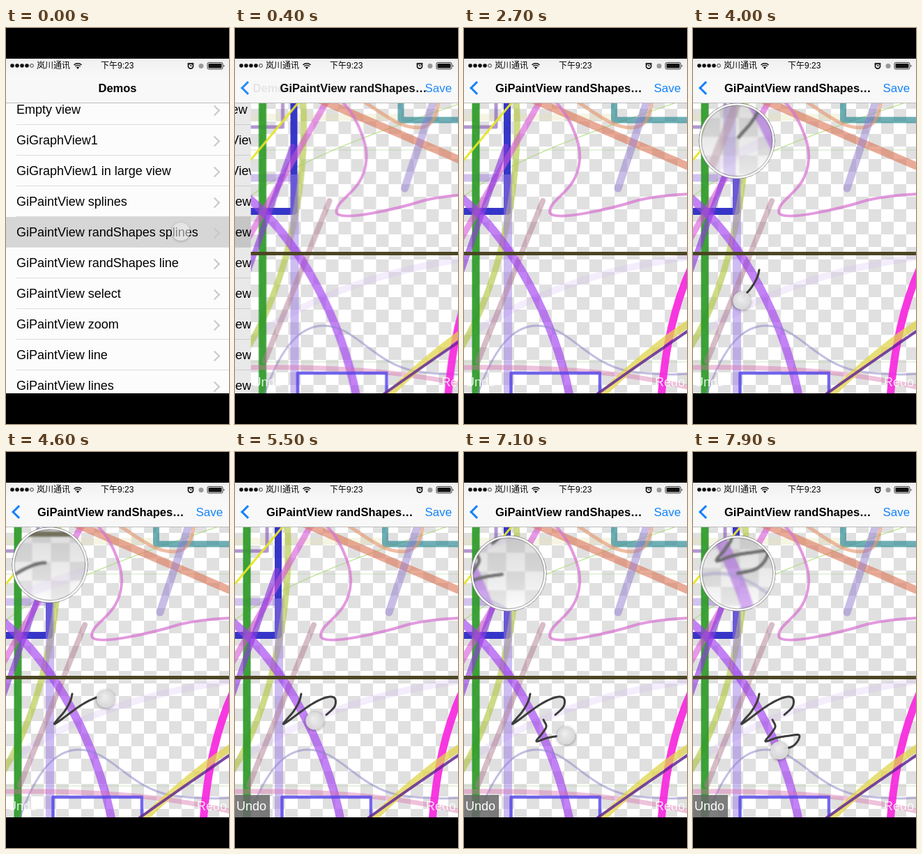
Write an HTML page with a canvas that moves like this. It is 320x568 px and loops after 8000 ms.

```html
<!DOCTYPE html>
<html lang="en">
<head>
<meta charset="utf-8">
<title>Paint demo</title>
<style>
  html, body { margin: 0; width: 100%; height: 100%; overflow: hidden; background: #000; }
  body { font-family: "Liberation Sans", "Noto Sans CJK SC", "Noto Sans CJK", sans-serif; color: #000; }
  #stage { position: absolute; left: 0; top: 0; width: 320px; height: 568px; overflow: hidden; background: #000; }
  #stage * { box-sizing: border-box; white-space: nowrap; }
  #stage div, #stage span, canvas, svg { position: absolute; }
  #screen { left: 0; top: 44px; width: 320px; height: 480px; overflow: hidden; background: #fcfcfc; }
  #list, #paint { left: 0; top: 0; width: 320px; height: 480px; }
  #list { background: #fcfcfc; }
  #shade { left: 0; top: 0; width: 320px; height: 480px; background: #000; }
  .row { left: 0; width: 320px; height: 44px; font-size: 18px; line-height: 44px; padding-left: 15px; }
  .row::before { content: ""; position: absolute; left: 15px; right: 0; bottom: 0; height: 1px; background: #dcdcdc; }
  .row::after, #back { content: ""; position: absolute; border: solid #c7c7cc; border-width: 2px 2px 0 0; width: 9px; height: 9px; }
  .row::after { left: 294px; top: 18px; transform: rotate(45deg); }
  .row.on { background: #d6d6d6; }
  .row.on::before { left: 0; }
  #tap { left: 238px; top: 235px; width: 26px; height: 26px; border-radius: 50%;
    background: rgba(240,240,240,.55); box-shadow: 0 1px 4px rgba(0,0,0,.25); }
  canvas { left: 0; top: -44px; width: 320px; height: 568px; }
  .btn { top: 448px; height: 32px; line-height: 32px; font-size: 18px; color: rgba(255,255,255,.85); }
  #undo { left: 0; width: 50px; padding-left: 2px; }
  #undo.on { background: rgba(104,104,104,.86); color: #fff; }
  #redo { left: 274px; }
  #nav { left: 0; top: 44px; width: 320px; height: 64px; background: linear-gradient(#f0f0f0, #f8f8f8 40%);
    border-bottom: 1px solid #bcbcbc; overflow: hidden; }
  #nav span { top: 32px; line-height: 21px; font-size: 17px; }
  #nav .title { font-weight: bold; font-size: 16.5px; }
  #demos { left: 0; width: 320px; text-align: center; }
  #name { left: 45px; }
  #nav #save { left: 272.5px; color: #1583f8; }
  #back { left: 11px; top: 35px; width: 14px; height: 14px; border-color: #1583f8; border-width: 0 0 3px 3px; transform: rotate(45deg); }
  #nav .stat { top: 2px; font-size: 12px; line-height: 17px; }
</style>
</head>
<body>
<div id="stage">
  <div id="screen">
    <div id="list"><div id="tap"></div><div id="shade"></div></div>
    <div id="paint">
      <canvas id="cv"></canvas>
      <div id="undo" class="btn">Undo</div>
      <div id="redo" class="btn">Redo</div>
    </div>
  </div>
  <div id="nav">
    <span class="stat" style="left:44px">岚川通讯</span>
    <span class="stat" style="left:136px">下午9:23</span>
    <svg width="320" height="20" style="left:0;top:0" fill="none" stroke="#111">
      <g fill="#111" stroke="none">
        <circle cx="9" cy="10" r="2.8"/><circle cx="16" cy="10" r="2.8"/>
        <circle cx="23" cy="10" r="2.8"/><circle cx="30" cy="10" r="2.8"/>
        <path d="M103 15l-2.2-2.6a3.4 3.4 0 0 1 4.4 0z"/>
        <rect x="290.5" y="7" width="19" height="6.5" rx="1"/>
        <path d="M312.5 8.5q2 1.8 0 3.6z"/>
      </g>
      <circle cx="37" cy="10" r="2.4" stroke-width=".8"/>
      <path d="M97.5 9a8 8 0 0 1 11 0M99.3 11a5.4 5.4 0 0 1 7.4 0" stroke-width="1.5"/>
      <rect x="289" y="5.5" width="22" height="9.5" rx="2" stroke-width=".8"/>
      <circle cx="265" cy="10.5" r="3.6" stroke-width="1.7"/>
      <path d="M265 8.5v2h1.6M260.5 8l2-2.2M269.5 8l-2-2.2" stroke-width="1.2"/>
      <circle cx="280" cy="10.5" r="3.5" fill="#999" stroke="none"/>
    </svg>
    <span id="demos" class="title">Demos</span>
    <span id="name" class="title">GiPaintView randShapes…</span>
    <span id="save">Save</span>
    <div id="back"></div>
  </div>
</div>
<script>
const LOOP = 8000, LAG = 75, PUSH = 130, PUSH_MS = 500, ZOOM = 1.5;
const $ = id => document.getElementById(id);
const clamp = (v, a = 0, b = 1) => Math.min(b, Math.max(a, v));

['Empty view', 'GiGraphView1', 'GiGraphView1 in large view', 'GiPaintView splines',
 'GiPaintView randShapes splines', 'GiPaintView randShapes line', 'GiPaintView select',
 'GiPaintView zoom', 'GiPaintView line', 'GiPaintView lines'].forEach((text, i) => {
  const row = document.createElement('div');
  row.className = i === 4 ? 'row on' : 'row';
  row.style.top = 51 + 44 * i + 'px';
  row.textContent = text;
  $('list').insertBefore(row, $('tap'));
});

const cv = $('cv'), g = cv.getContext('2d'), dpr = window.devicePixelRatio || 1;
cv.width = 320 * dpr;
cv.height = 568 * dpr;

// Finger strokes: steps of time, x, y
const strokes = [
  { lens: [63, 162], delay: 150, end: 5000, steps: [
    [3450, 95, 347], [3600, 92, 358], [3800, 84, 372], [4000, 70, 390], [4250, 108, 363],
    [4450, 131, 352], [4600, 143, 353], [4750, 143, 365], [4950, 131, 377]] },
  { lens: [64, 174], delay: 200, end: LOOP, steps: [
    [5400, 114, 384], [5600, 115, 386], [5850, 118, 394], [6100, 112, 404], [6350, 104, 415],
    [6700, 120, 410], [7000, 138, 407], [7200, 152, 406], [7400, 150, 415],
    [7600, 141, 423], [7830, 124, 427]] }
];

function fingerAt(steps, t) {
  const last = steps.length - 1;
  t = clamp(t, steps[0][0], steps[last][0]);
  let i = 0;
  while (i < last - 1 && t > steps[i + 1][0]) i++;
  const a = steps[Math.max(0, i - 1)], b = steps[i], c = steps[i + 1], d = steps[Math.min(last, i + 2)];
  const u = (t - b[0]) / (c[0] - b[0]);
  return [1, 2].map(k => b[k] + u / 2 * (c[k] - a[k] +
    u * (2 * a[k] - 5 * b[k] + 4 * c[k] - d[k] + u * (3 * (b[k] - c[k]) + d[k] - a[k]))));
}

const shapes = [];
const add = (rgba, width, d, cap = 'butt') =>
  shapes.push({ color: `rgba(${rgba})`, width, path: new Path2D(d), cap });

add('230,225,180,.35', 10, 'M0 128H215');
add('210,180,240,.24', 10, 'M-5 450C90 380 200 345 325 328');
add('165,205,130,.5', 1, 'M0 175H320M0 479H320');
add('165,215,110,.7', 1.3, 'M-5 245C70 185 180 150 325 100');
add('150,110,220,.42', 11, 'M0 215H57');
add('45,45,200,.95', 10, 'M62 100V263H-5');
add('130,80,180,.6', 5, 'M46 100V142H-5');
add('180,200,70,.65', 9, 'M75 100C83 230 49 373 -5 460');
add('155,125,230,.5', 12, 'M63 210V530');
add('45,155,40,.92', 11, 'M17 100V530');
add('230,230,40,.95', 3, 'M-4 194L76 98');
add('215,85,215,.6', 9, 'M112 100L-5 304');
add('140,60,220,.65', 8, 'M60 170L-4 350', 'round');
add('175,125,145,.5', 8, 'M113 248L20 478', 'round');
add('160,60,240,.64', 12, 'M-8 240C71 304 131 420 152 530');
add('220,120,90,.62', 11, 'M88 98L325 200');
add('50,140,150,.7', 9, 'M215.5 100V132H325');
add('230,150,110,.62', 5, 'M150 98C185 118 210 143 240 143C262 143 268 125 270 98');
add('145,125,205,.5', 11, 'M264 100L221 230', 'round');
add('215,115,210,.72', 4, 'M122 98C150 118 168 165 166 188C163 236 123 243 123 264C126 280 215 258 250 247Q280 240 325 238');
add('75,70,35,1', 5, 'M0 323.5H320');
add('140,130,200,.52', 3, 'M18 530C45 450 75 427 105 427C150 427 175 480 235 492Q280 499 325 496');
add('215,110,170,.42', 7, 'M-5 487C110 485 220 491 325 516');
add('85,70,235,.82', 4.5, 'M67.5 530V495H195V530');
add('248,40,222,.92', 11, 'M327 342C303 393 289 453 283 530');
add('226,212,75,.75', 10, 'M190 535C225 498 275 455 325 422');
add('100,40,150,.85', 4, 'M183 531C231 496 280 463 325 432');

function scene(t) {
  g.fillStyle = '#fff';
  g.fillRect(0, 44, 320, 480);
  g.fillStyle = '#e0e0e0';
  for (let r = 0; r < 27; r++)
    for (let c = r % 2; c < 18; c += 2) g.fillRect(c * 18, 44 + r * 18, 18, 18);
  for (const s of shapes) {
    g.strokeStyle = s.color;
    g.lineWidth = s.width;
    g.lineCap = s.cap;
    g.stroke(s.path);
  }
  g.strokeStyle = '#3c3c3c';
  g.lineWidth = 3;
  g.lineCap = g.lineJoin = 'round';
  for (const { steps } of strokes) {
    const from = steps[0][0], to = Math.min(t, steps[steps.length - 1][0]);
    if (to <= from) continue;
    g.beginPath();
    for (let k = from; k < to; k += 20) g.lineTo(...fingerAt(steps, k));
    g.lineTo(...fingerAt(steps, to));
    g.stroke();
  }
}

function disc(x, y, r) {
  g.beginPath();
  g.arc(x, y, r, 0, 2 * Math.PI);
}

function dot(x, y) {
  const fill = g.createRadialGradient(x - 2, y - 3, 1, x, y, 13);
  fill.addColorStop(0, 'rgba(242,242,242,.95)');
  fill.addColorStop(1, 'rgba(218,218,218,.95)');
  g.save();
  g.shadowColor = 'rgba(0,0,0,.4)';
  g.shadowBlur = 4 * dpr;
  g.shadowOffsetY = dpr;
  g.fillStyle = fill;
  disc(x, y, 13);
  g.fill();
  g.restore();
}

// Enlarges what the canvas already shows around the finger
function lens([cx, cy], [x, y]) {
  const r = 54, s = r / ZOOM;
  g.save();
  disc(cx, cy, 53);
  g.clip();
  g.filter = `blur(${dpr}px)`;
  g.drawImage(cv, (x - s) * dpr, (y - s) * dpr, 2 * s * dpr, 2 * s * dpr, cx - r, cy - r, 2 * r, 2 * r);
  g.restore();
  const glass = g.createLinearGradient(0, cy - r, 0, cy + r);
  glass.addColorStop(0, 'rgba(165,165,165,.42)');
  glass.addColorStop(.5, 'rgba(195,195,195,.35)');
  glass.addColorStop(1, 'rgba(250,250,250,.4)');
  g.fillStyle = glass;
  disc(cx, cy, 53);
  g.fill();
  for (const [radius, w, color] of [[54.2, 1, '#777'], [52.5, 2.5, '#f8f8f8'], [50.8, 1, 'rgba(90,90,90,.5)']]) {
    g.strokeStyle = color;
    g.lineWidth = w;
    disc(cx, cy, radius);
    g.stroke();
  }
}

function draw(t) {
  const p = 1 - Math.pow(1 - clamp((t - PUSH) / PUSH_MS), 3.4), off = 320 * (1 - p);
  $('list').style.transform = `translateX(${-96 * p}px)`;
  $('paint').style.transform = `translateX(${off}px)`;
  $('shade').style.opacity = .08 * p;
  $('tap').style.opacity = 1 - clamp(t / 150);
  $('demos').style.transform = `translateX(${-115 * p}px)`;
  $('demos').style.opacity = 1 - p;
  $('name').style.transform = `translateX(${off * .87}px)`;
  for (const id of ['name', 'save', 'back']) $(id).style.opacity = p;
  $('undo').classList.toggle('on', t >= strokes[0].end);

  g.setTransform(dpr, 0, 0, dpr, 0, 0);
  scene(t - LAG);
  for (const s of strokes) {
    const start = s.steps[0][0];
    if (t < start || t >= s.end) continue;
    const at = fingerAt(s.steps, t);
    if (t >= start + s.delay) lens(s.lens, at);
    dot(at[0], at[1] + 1);
  }
}

function tick() {
  draw(performance.now() % LOOP);
  requestAnimationFrame(tick);
}
tick();
</script>
</body>
</html>
```
